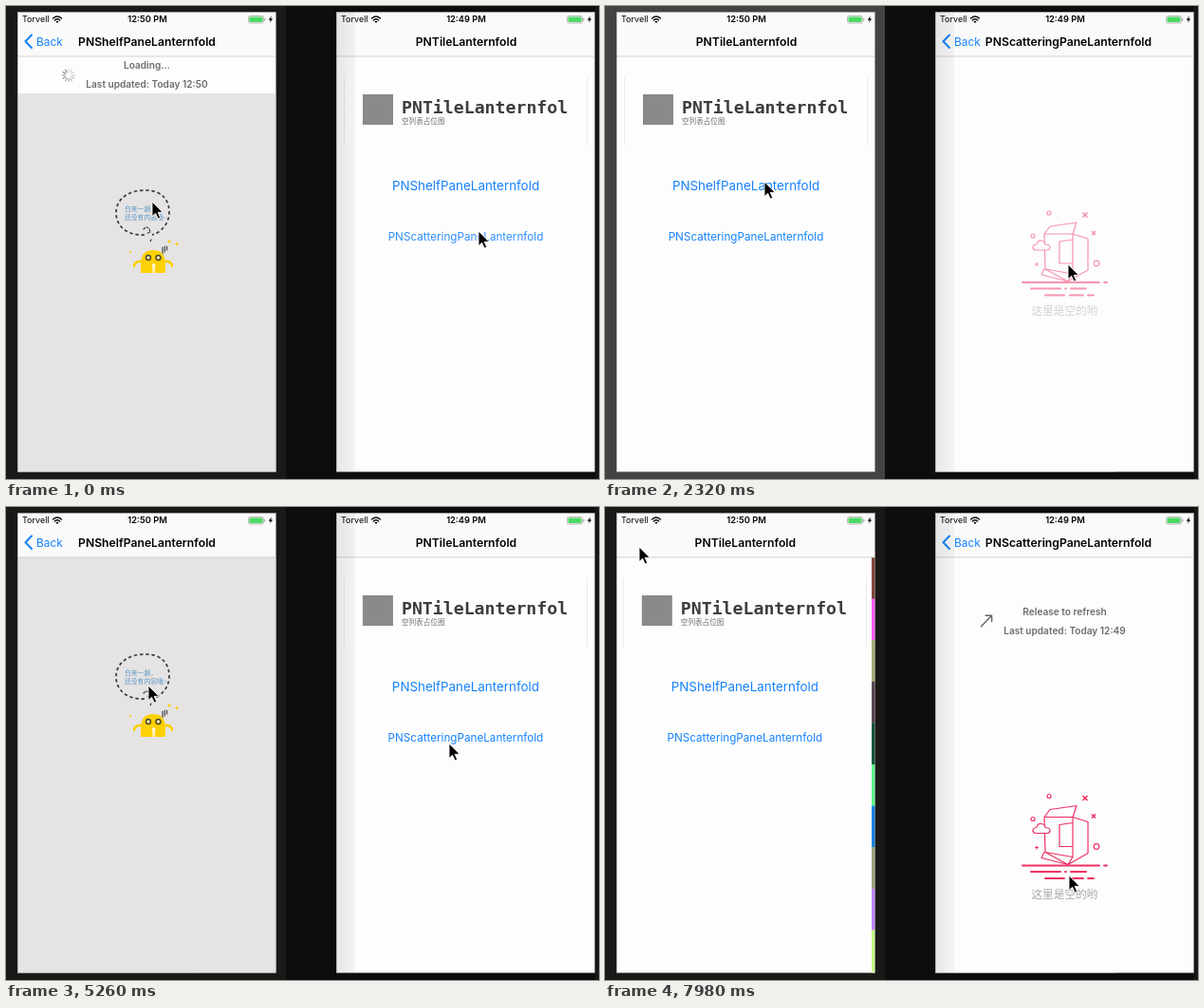
Write an HTML page that moves like this. It is 625 px wide and 498 px high and loops after 8000 ms.

```html
<!DOCTYPE html>
<html lang="en">
<head>
<meta charset="utf-8">
<title>Pull to refresh demo</title>
<style>
  html, body { margin: 0; width: 100%; height: 100%; overflow: hidden; background: #0d0d0d; }
  svg { display: block; width: 625px; height: 498px; font-family: Inter, sans-serif; }
  .cjk { font-family: "Noto Sans CJK SC", "Noto Sans CJK", sans-serif; }
  .mid { text-anchor: middle; }
  .semi { font-weight: 600; }
  .light { font-weight: 300; fill: #a9a9a9; }
  .blue { fill: #1682fb; }
  .grey { fill: #6c6c6c; }
  .word { font: bold 18.2px "DejaVu Sans Mono", monospace; fill: #3d3d3d; }
  .line { fill: none; stroke-linecap: round; stroke-linejoin: round; }
</style>
</head>
<body>
<svg id="stage" viewBox="0 0 625 498"></svg>
<script>
const LOOP = 8000, WIDTH = 273, TOP = 53, ROW = 43.6, CELL = 125, PITCH = 132.4;
const LOADING = 39, PULLED = 86.5, CENTER = 148.5;

const NAMES = {
  list: 'PNTileLanternfold',
  table: 'PNShelfPaneLanternfold',
  grid: 'PNScatteringPaneLanternfold'
};
const ROWS_A = ['#328b52', '#a85862', '#0d929e', '#7a4b8f', '#0c1dd0', '#1dd07a', '#78ba10', '#e14f6c', '#94c5b1', '#a2b620'];
const ROWS_B = ['#7d4538', '#fb5cf3', '#a3ae74', '#57444f', '#145336', '#5df58a', '#1583e0', '#9aa27c', '#c184f3', '#c6f77f'];
const CELLS = ['#2dd155', '#9fc9c3', '#a9cdcb', '#9f9947', '#ddb151', '#d9df41', '#8d4be7', '#677f5d'];

// ---- what happens on each phone, and where each cursor arrives when ----
const STORY = {
  left: [[-900, 'push'], [740, 'loaded'], [1310, 'pop'], [2430, 'push'], [4000, 'loaded'], [5560, 'drag'], [6950, 'loaded'], [7580, 'pop']],
  right: [[80, 'push'], [1100, 'loaded'], [2330, 'drag'], [3560, 'loaded'], [4780, 'pop'], [5570, 'push'], [6850, 'loaded'], [7400, 'drag']]
};
const STOPS = {
  left: [[0, 154, 206], [830, 203, 264], [1270, 32, 38], [1830, 168, 185], [3500, 165, 185], [4500, 150, 188], [6140, 154, 270], [6640, 83, 70], [7380, 36, 42]],
  right: [[0, 498, 237], [830, 513, 246], [1830, 488, 272], [2910, 488, 385], [3620, 473, 133], [4200, 370, 40], [5250, 467, 249], [6300, 495, 252], [7980, 489, 388]]
};

// ---- timing helpers ----
const clamp = k => Math.min(1, Math.max(0, k));
const ramp = (t, from, length) => clamp((t - from) / length);
const easeOut = k => 1 - (1 - k) ** 3;
const smooth = k => k * k * (3 - 2 * k);
const between = (t, from, to, fade = 1) => ramp(t, from, fade) * (1 - ramp(t, to, fade));
const latest = (t, side, ...kinds) => STORY[side].findLast(([at, kind]) => at <= t && kinds.includes(kind));

function pushAt(t, side) {
  const [at, kind] = latest(t, side, 'push', 'pop') || [0, 'pop'];
  const k = kind === 'push' || at ? easeOut(ramp(t, at, 530)) : 1;
  return kind === 'push' ? k : 1 - k;
}

function pullAt(t, side) {
  const [at, kind] = latest(t, side, 'push', 'loaded', 'drag') || [0, 'push'];
  const u = t - at;
  if (kind === 'loaded') return { offset: LOADING * (1 - easeOut(ramp(u, 0, 360))) };
  if (kind === 'push') return { offset: LOADING };
  return {
    offset: PULLED * easeOut(ramp(u, 0, 570)) - (PULLED - LOADING) * easeOut(ramp(u, 640, 200)),
    dragging: u < 640,
    angle: 180 * (1 - ramp(u, 430, 200))
  };
}

// A tapped button goes pale just before its page slides in.
const tapFade = (t, side) => 1 - .78 * STORY[side]
  .filter(([, kind]) => kind === 'push')
  .reduce((sum, [at]) => sum + between(t, at - 90, at + 70, 80), 0);

function cursorAt(t, side) {
  const stops = STOPS[side], next = stops.findIndex(([at]) => at > t);
  if (next < 0) return stops.at(-1).slice(1);
  const [from, to] = [stops[next - 1], stops[next]];
  const length = Math.min(560, to[0] - from[0]);
  const k = smooth(ramp(t, to[0] - length, length));
  return [1, 2].map(i => from[i] + (to[i] - from[i]) * k);
}

// ---- markup helpers ----
const text = (x, y, size, str, cls = '', name = '') =>
  `<text x="${x}" y="${y}" font-size="${size}" class="${cls}" data-n="${name}">${str}</text>`;
const rect = (x, y, w, h, fill, more = '') =>
  `<rect x="${x}" y="${y}" width="${w}" height="${h}" fill="${fill}" ${more}/>`;
const group = (name, body) => `<g data-n="${name}">${body}</g>`;
const ring = (x, y, r) => `<circle cx="${x}" cy="${y}" r="${r}"/>`;
const line = (d, color, width, more = '') =>
  `<path class="line" d="${d}" stroke="${color}" stroke-width="${width}" ${more}/>`;

const rows = (name, colors) => group(name, colors.map((c, i) => {
  const y = TOP + i * ROW;
  return rect(12, y, WIDTH, ROW + .3, c) + rect(24, y + ROW - .5, WIDTH - 12, .7, '#d8d8dc', 'opacity=".7"');
}).join(''));

const cells = group('cells', CELLS.map((c, i) =>
  rect(20 + i % 2 * PITCH, 60.4 + (i >> 1) * PITCH, CELL, CELL, c)).join(''));

const YELLOW = '#fdd104';
const mascot = group('mascot', rect(12, TOP, WIDTH, 440, '#e5e3e4') +
  line('M146 202C128 203 116 193 116 179C116 164 129 155 147 155C163 155 172 164 172 178C172 190 164 199 154 202',
    '#3a3a3a', 1.7, 'stroke-dasharray="3.4 2.8" style="stroke-linecap:butt"') +
  line('M145 196q4 -4 6 0t-2 4M153 207l-1 2', '#3a3a3a', 1.2, 'stroke-dasharray="2 1.6"') +
  line('M165 215v7m2.300 -8v6m2.300 -6v4', '#3a3a3a', 1.1) +
  `<g fill="#5b97c4">${text(125, 177.3, 6.8, '白来一趟，', 'cjk')}${text(125, 186.3, 6.8, '还没有内容哦~', 'cjk')}</g>
  <path d="M142 242V231Q143 218 155 218T168 231V242Z" fill="${YELLOW}"/>` +
  line('M143 230Q136 229 135 235M167 230Q174 229 175 235', YELLOW, 2.6) +
  `<g fill="${YELLOW}">${ring(131, 220, 1)}${ring(172, 209, 1.6)}${ring(180, 211.5, 1.4)}</g>
  <g fill="#f4e9b4" stroke="#4b4326" stroke-width="1.4">${ring(150, 226, 2.5)}${ring(160.5, 226, 2.5)}</g>
  <path d="M153.500 233q2 -2 4 0l-.6 9h-2z" fill="#fff3c2"/>`);

const PINK = '#ee3164';
const emptyBox = group('emptyBox',
  line('M127 240L133 232L161 228L157 240ZM127 240L128 277L152 290L173 278V245L157 240V282M127 277L124 283L152 290L157 282L128 277M143 248L157 246V271H143Z', PINK, 1.2) +
  line('M118 257q-3 0 -3 -3t4 -3q1 -5 5 -4t4 4q5 0 5 3t-3 3z', PINK, 1.2, 'style="fill:#fdfdfd"') +
  `<g class="line" stroke="${PINK}" stroke-width="1.2">${ring(132, 218, 2)}${ring(115, 242, 2)}${ring(182, 271, 2.8)}</g>` +
  line('M168 218l4 4m0 -4l-4 4M177.500 237.500l3 3m0 -3l-3 3', PINK, 1.7) +
  line('M117.500 272h3M119 270.500v3', PINK, 1.2) +
  `<g style="stroke-linecap:butt">${line('M104 291H185M190 291H193M113 297.500H144M149 297.500h1M155 297.500H171M128 304.500H148M154 304.500H168M173 304.500h6', PINK, 1.9)}</g>` +
  text(CENTER, 325.3, 11.7, '这里是空的哟', 'cjk mid light'));

const spinner = Array.from({ length: 12 }, (_, i) =>
  line('M0 -3.600V-6.700', '#666', 1.1, `opacity="${.2 + i * .06}" transform="rotate(${i * 30})"`)).join('');

const header = group('header',
  group('spinner', spinner) +
  group('arrow', line('M0 8V-8M-4.500 -3.500L0 -8L4.500 -3.500', '#666', 1.5)) +
  text(CENTER, 66.3, 10.1, '', 'mid semi grey', 'status') +
  text(CENTER, 86.2, 10.1, '', 'mid semi grey', 'updated'));

const statusBar = clock => text(17, 17.3, 9, 'Torvell') +
  line('M49.500 13Q54 8.800 58.500 13M51.300 15Q54 12.500 56.700 15', '#111', 1.4) +
  '<path d="M52.400 16.300Q54 15 55.600 16.300L54 18Z"/>' +
  text(149, 17.3, 9.3, clock, 'mid semi') +
  rect(255.5, 10.5, 16, 7.5, 'none', 'rx="1.8" stroke="#9c9c9c" stroke-width=".7"') +
  rect(256.5, 11.5, 14, 5.5, '#4cd964', 'rx="1"') + rect(272.3, 13, 1, 2.6, '#9c9c9c') +
  '<path d="M279.800 10.500L276.700 14.700H278.800L278 17.600L281.200 13.400H279.200Z"/>';

const listPage = group('list', rect(12, TOP, WIDTH, 440, '#fdfdfd') +
  [20, 276.3].map(x => rect(x, 75, .8, 72, '#e6e6e6')).join('') +
  rect(40, 93, 32, 32, '#8a8a8a') +
  text(81, 112.5, 18.2, NAMES.list.slice(0, -1), 'word') +
  text(81, 123.7, 7.6, '空列表占位图', 'cjk grey') +
  text(CENTER, 193.6, 13.4, NAMES.table, 'mid blue', 'tableButton') +
  text(CENTER, 247, 11.7, NAMES.grid, 'mid blue', 'gridButton'));

const phone = (id, dx, clock, title, titleX, content) => `
  <g id="${id}" transform="translate(${dx} 0)"><g clip-path="url(#screen)">
    ${listPage}
    ${group('page', rect(12, TOP, WIDTH, 440, '#fdfdfd') + header + group('content', content))}
    ${rect(12, 6, WIDTH, TOP - 6, '#fafafa') + rect(12, TOP - .4, WIDTH, .8, '#c9c9cb') + statusBar(clock)}
    ${text(149, 41.5, 12.2, NAMES.list, 'mid semi', 'listTitle')}
    ${text(titleX, 41.5, 12.2, title, 'mid semi', 'pageTitle')}
    ${group('back', line('M27 30.500L20.500 37.200L27 44', '#1682fb', 2) + text(32, 41.7, 11.9, 'Back', 'blue'))}
    ${dx ? rect(12, 6, 20, 485, 'url(#edge)') : ''}
  </g>${rect(12.4, 6.6, 272.2, 483.8, 'none', 'stroke="#777" stroke-width=".8" opacity=".6"')}</g>`;

const cursor = id => `<path id="${id}" d="M0 0V15.600L3.600 12.300L6.200 18L8.700 16.900L6.200 11.300H11.200Z" stroke="#fff" stroke-width=".9"/>`;

const byId = id => document.getElementById(id);
byId('stage').innerHTML = `
  <defs>
    <clipPath id="screen">${rect(12, 6.3, 272.7, 484.3, '#000')}</clipPath>
    <linearGradient id="edge"><stop stop-opacity=".09"/><stop offset="1" stop-opacity=".035"/></linearGradient>
  </defs>
  ${rect(0, 0, 625, 498, '#0d0d0d')}
  ${rect(0, 0, 295, 498, '#1b1918', 'id="backdrop"')}
  ${rect(621, 0, 4, 498, '#181716')}
  ${phone('left', 0, '12:50 PM', NAMES.table, CENTER, mascot + rows('rowsA', ROWS_A) + rows('rowsB', ROWS_B))}
  ${phone('right', 336, '12:49 PM', NAMES.grid, 152.5, cells + emptyBox)}
  ${cursor('leftCursor')}${cursor('rightCursor')}`;

const collect = id => Object.fromEntries(
  [...document.querySelectorAll(`#${id} [data-n]`)].map(n => [n.dataset.n, n]));
const parts = { left: collect('left'), right: collect('right') };

const place = (node, x, y = 0, turn = 0) => node.setAttribute('transform', `translate(${x} ${y}) rotate(${turn})`);
const fade = (node, v) => node.setAttribute('opacity', v);

function drawPhone(t, side, updated) {
  const p = parts[side], push = pushAt(t, side);
  const { offset, dragging = false, angle = 180 } = pullAt(t, side);

  place(p.list, -.3 * WIDTH * push);
  place(p.page, WIDTH * (1 - push));
  place(p.listTitle, -80 * push);
  place(p.pageTitle, 130 * (1 - push));
  fade(p.listTitle, 1 - push);
  fade(p.pageTitle, push ** 2);
  fade(p.back, push ** 2);

  place(p.header, 0, offset - LOADING);
  place(p.spinner, 66, 73, Math.floor(t / 83) * 30);
  place(p.arrow, 66, 72.5, angle);
  fade(p.spinner, +!dragging);
  fade(p.arrow, +dragging);
  p.status.textContent = !dragging ? 'Loading...' : angle < 180 ? 'Release to refresh' : 'Pull down to refresh';
  p.updated.textContent = 'Last updated: Today ' + updated;
  place(byId(side + 'Cursor'), ...cursorAt(t, side));
  return offset;
}

function render(t) {
  const { left, right } = parts;

  place(left.content, 0, drawPhone(t, 'left', between(t, 1900, 4000) ? '12:49' : '12:50'));
  fade(left.mascot, 1 - between(t, 740, 4000) - ramp(t, 6950, 1));
  fade(left.rowsA, between(t, 740, 1900));
  fade(left.rowsB, ramp(t, 6950, 1));
  fade(left.tableButton, tapFade(t, 'left'));

  place(right.emptyBox, 0, drawPhone(t, 'right', t < 1100 ? '12:48' : '12:49'));
  fade(right.emptyBox, between(t, 2270, 3550, 100) + ramp(t, 7080, 100));
  fade(right.cells, between(t, 3550, 5350, 140));
  fade(right.gridButton, tapFade(t, 'right'));

  byId('backdrop').setAttribute('fill', between(t, 1600, 2450) ? '#444342' : '#1b1918');
}

const start = performance.now();
function tick() {
  render((performance.now() - start) % LOOP);
  requestAnimationFrame(tick);
}
render(0);
requestAnimationFrame(tick);
</script>
</body>
</html>
```
